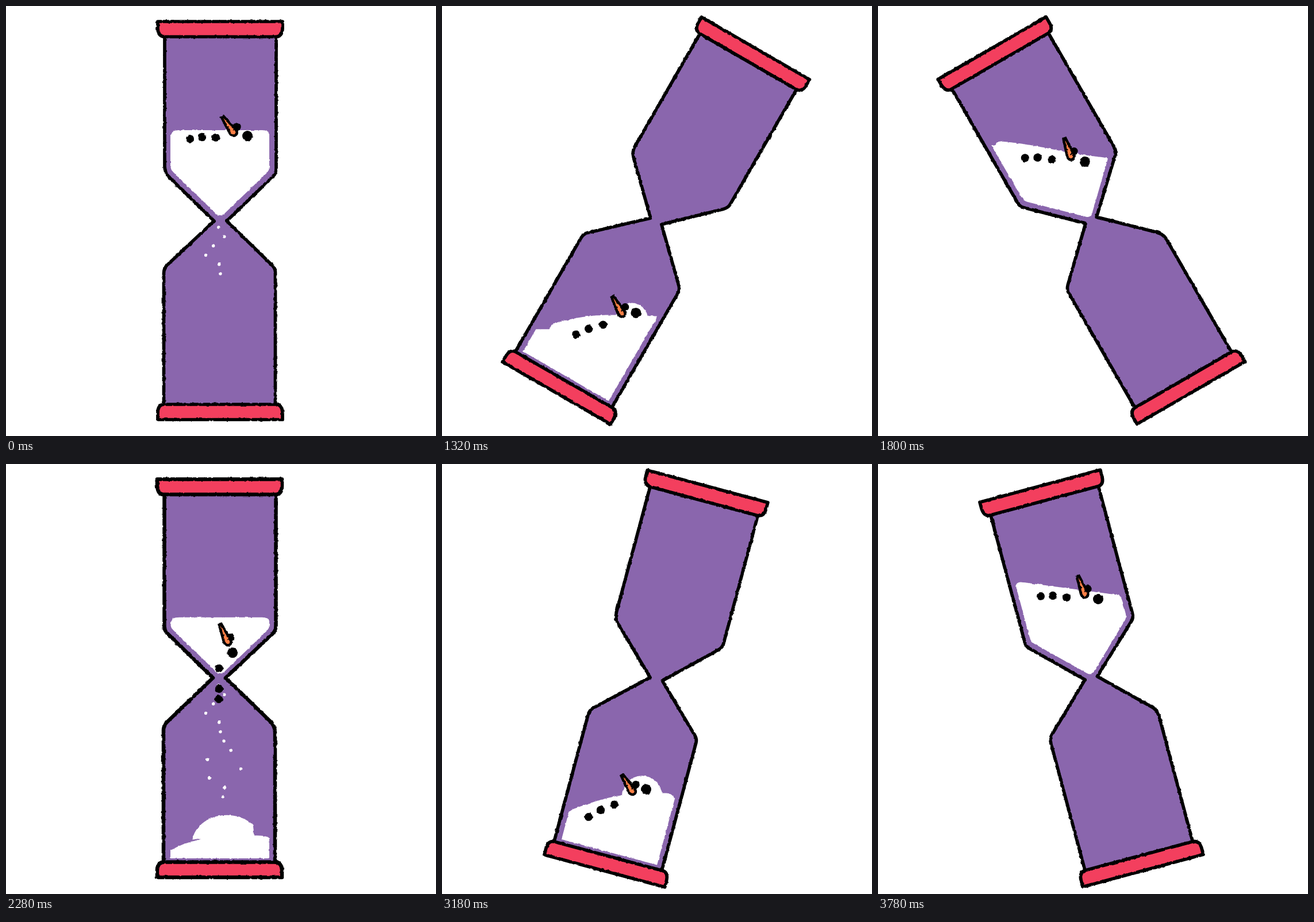
These frames come from a looping animation (748x748 px, 3840 ms). An HTML page with a canvas:

```html
<!DOCTYPE html>
<html lang="en">
<head>
<meta charset="utf-8">
<title>Snowman hourglass</title>
<style>
  html, body { margin: 0; width: 100%; height: 100%; overflow: hidden; background: #fff; }
  canvas { display: block; filter: url(#rough); }
  svg { position: absolute; }
</style>
</head>
<body>
<svg width="0" height="0">
  <filter id="rough" x="0" y="0" width="100%" height="100%" color-interpolation-filters="sRGB">
    <feTurbulence type="fractalNoise" baseFrequency=".16" numOctaves="2" seed="4"/>
    <feDisplacementMap in="SourceGraphic" scale="3" xChannelSelector="R" yChannelSelector="G"/>
  </filter>
</svg>
<canvas id="stage" width="748" height="748"></canvas>
<script>
const ctx = document.getElementById('stage').getContext('2d');
const LOOP = 3840, CYCLE = 1920, STEP = 60, DONE = 780, TURN = 1260;
const CX = 372, CY = 373, FALL_SPEED = 1.2;
const PURPLE = '#8a66ad', RED = '#f33f5e', ORANGE = '#ff7f45';

const glass = new Path2D(`M276 50V279Q276 291 285 299L362 374L280 451Q274.5 456 274.5 465V696
  H468.5V463Q468.5 457 464 452L384 374L464 297Q470 291 470 284V50Z`);
const caps = new Path2D(`M264 27H481V40Q480 53.5 469 53.5H276Q265 53 264 40Z
  M264 719.5H481V708Q480 693 470 693H274Q264 694 264 708Z`);
const chamber = new Path2D(`M286 686H458V469Q458 462 453 457L378 384Q372 378 366 383
  L291 455Q286 460 286 467Z`);
const ground = new Path2D('M286 662Q310 648 338 643L430 636Q450 635 458 640V760H286Z');
const snowman = new Path2D(`M338 641L320 644Q314 640 315 620Q320 585 352 568L405 572
  Q432 590 431 640V660H338Z M416.5 543A36 36 0 1 1 344.5 543A36 36 0 1 1 416.5 543Z`);

// Each loose part: place in the lying row, place on the snowman, time it slips through the neck.
const dots = [
  { row: [0, 0], home: [359, 623], neckAt: 330, r: 7 },
  { row: [21, -2], home: [357, 601], neckAt: 345, r: 7.2 },
  { row: [45, 0], home: [364, 580], neckAt: 410, r: 7 },
  { row: [82, -17], home: [360, 524], neckAt: 640, r: 6.7 },
  { row: [100, 0], home: [385, 525], neckAt: 517, r: 9 }
];
const nose = { row: [78, -4], home: [369, 545], neckAt: 600, length: 37, homeAngle: 8 };

// Snow surface: left and right end, wave height. Row of parts: x, y, scale, slope, nose angle.
const poses = [
  { at: TURN, snow: [218, 604, 403, 573, 0], row: [255, 614, 1, -.48, 58] },
  { at: 1560, snow: [61, 355, 331, 408, 8], row: [147, 401, 1.2, .12, 75] },
  { at: 1860, snow: [239, 204, 426, 229, 0], row: [283, 230, 1, .05, 69] },
  { at: CYCLE, snow: [287, 216, 459, 216, 0], row: [320, 231, 1, -.05, 55] }
];
const level = poses[3];

const mix = (a, b, k) => a + (b - a) * k;
const mixAll = (a, b, k) => a.map((v, i) => mix(v, b[i], k));
const progress = (t, from, to) => Math.min(1, Math.max(0, (t - from) / (to - from)));
const random = seed => Math.abs(Math.sin(seed * 127.1) * 43758.5) % 1;

function poseAt(t) {
  const next = poses.findIndex(p => p.at > t), a = poses[next - 1], b = poses[next];
  const k = progress(t, a.at, b.at);
  return { snow: mixAll(a.snow, b.snow, k), row: mixAll(a.row, b.row, k) };
}

function inRow([dx, dy], [x, y, scale, slope]) {
  return [x + dx * scale, y + dx * scale * slope + dy];
}

// Slides with the snow to the neck, then drops to its place on the snowman.
function sinking(part, t) {
  const [x, y] = inRow(part.row, level.row), [hx, hy] = part.home;
  const slide = progress(t, 0, part.neckAt);
  const fall = progress(t, part.neckAt, part.neckAt + (hy - CY) / FALL_SPEED);
  return {
    point: fall ? [mix(CX, hx, fall), mix(CY, hy, fall)] : [mix(x, CX, slide ** 1.7), mix(y, CY, slide)],
    slide, fall
  };
}

function turned(degrees, draw) {
  ctx.save();
  ctx.translate(CX, CY);
  ctx.rotate(degrees * Math.PI / 180);
  ctx.translate(-CX, -CY);
  draw();
  ctx.restore();
}

function insideChamber(degrees, draw) {
  ctx.save();
  const clip = new Path2D();
  clip.addPath(chamber, new DOMMatrix().translate(CX, CY).rotate(degrees).translate(-CX, -CY));
  ctx.clip(clip);
  ctx.fillStyle = '#fff';
  draw();
  ctx.restore();
}

function dot([x, y], r, color) {
  ctx.fillStyle = color;
  ctx.beginPath();
  ctx.arc(x, y, r, 0, 2 * Math.PI);
  ctx.fill();
}

function drawGlass(degrees, width) {
  turned(degrees, () => {
    ctx.lineWidth = width;
    ctx.lineJoin = 'round';
    ctx.strokeStyle = '#000';
    for (const [path, color] of [[glass, PURPLE], [caps, RED]]) {
      ctx.fillStyle = color;
      ctx.fill(path);
      ctx.stroke(path);
    }
  });
}

function drawSnow([x1, y1, x2, y2, wave], hump, dy) {
  ctx.beginPath();
  ctx.moveTo(-50, 800);
  ctx.lineTo(-50, y1 + dy + 8);
  for (let u = 0; u <= 1; u += 1 / 64) {
    const roundedEnd = 8 * Math.abs(2 * u - 1) ** 30;
    const swell = wave * Math.sin(2 * Math.PI * u) + hump * Math.sin(Math.PI * u);
    ctx.lineTo(mix(x1, x2, u), mix(y1, y2, u) + dy + roundedEnd - swell);
  }
  ctx.lineTo(800, y2 + dy + 8);
  ctx.lineTo(800, 800);
  ctx.fill();
}

function drawFlakes(t) {
  const count = 13, top = 385, span = 210, speed = span / 360;
  for (let i = 0; i < count; i++) {
    const y = top + (i * span / count + speed * t) % span;
    const spread = Math.min(38, (y - 375) * .5);
    const front = 475 + speed * t, tail = 375 + speed * (t - 600);
    if (y < front && y > tail) dot([CX + mix(-spread, spread, random(i + 1)), y], 2.7, '#fff');
  }
}

// The ground rises while a growing dome uncovers the snowman.
function drawPile(t) {
  const grown = progress(t, STEP, DONE), dy = 52 * (1 - grown) ** 3;
  ctx.translate(0, dy);
  ctx.fill(ground);
  ctx.beginPath();
  ctx.ellipse(384, 660 - dy, 45 + 105 * grown ** 2.2, 200 * grown ** 1.6, 0, 0, 2 * Math.PI);
  ctx.clip();
  ctx.fill(snowman);
}

// A carrot whose thick end is at the given point, pointing back along the angle.
function drawNose([x, y], angle) {
  const { length } = nose;
  ctx.save();
  ctx.translate(x, y);
  ctx.rotate(angle * Math.PI / 180);
  ctx.translate(-length, 0);
  ctx.beginPath();
  ctx.moveTo(0, -2);
  ctx.lineTo(length - 4, -6);
  ctx.quadraticCurveTo(length + 3, -5, length + 2, 1);
  ctx.quadraticCurveTo(length, 6.5, length - 7, 6);
  ctx.lineTo(0, 2);
  ctx.closePath();
  ctx.fillStyle = ORANGE;
  ctx.fill();
  ctx.lineWidth = 4.5;
  ctx.stroke();
  ctx.lineWidth = 2;
  ctx.beginPath();
  for (let i = 1; i < 4; i++) {
    const side = i % 2 ? -1 : 1;
    ctx.moveTo(length * i / 4, 4 * side);
    ctx.lineTo(length * i / 4 + 2, side);
  }
  ctx.stroke();
  ctx.restore();
}

function drawTurning(t, degrees) {
  const { snow, row } = poseAt(t);
  const left = 1 - progress(t, TURN, 1560);
  insideChamber(degrees, () => {
    drawSnow(snow, 12 * left, 0);
    dot(inRow([93, 8], row), 35 * left, '#fff');
  });
  for (const d of dots) dot(inRow(d.row, row), d.r, '#000');
  drawNose(inRow(nose.row, row), row[4]);
}

function drawDraining(t) {
  insideChamber(180, () => drawSnow(level.snow, 0, 165 * (t / 720) ** 1.7));
  if (t < DONE) drawFlakes(t);
  insideChamber(0, () => drawPile(t));
  for (const d of dots) dot(sinking(d, t).point, d.r, '#000');
  const { point, slide, fall } = sinking(nose, t);
  drawNose(point, mix(mix(level.row[4], 75, slide), nose.homeAngle, fall));
}

function draw(time) {
  const t = time % CYCLE, turning = t >= TURN;
  const degrees = turning ? (t - TURN + STEP) / STEP * 15 : time >= CYCLE ? 180 : 0;
  ctx.fillStyle = '#fff';
  ctx.fillRect(0, 0, 748, 748);
  drawGlass(degrees, degrees && degrees % 90 === 0 ? 6.5 : 5.7);
  if (turning) drawTurning(t, degrees);
  else drawDraining(Math.min(t, DONE));
}

function frame() {
  draw(Math.floor(performance.now() % LOOP / STEP) * STEP);
  requestAnimationFrame(frame);
}
frame();
</script>
</body>
</html>
```
